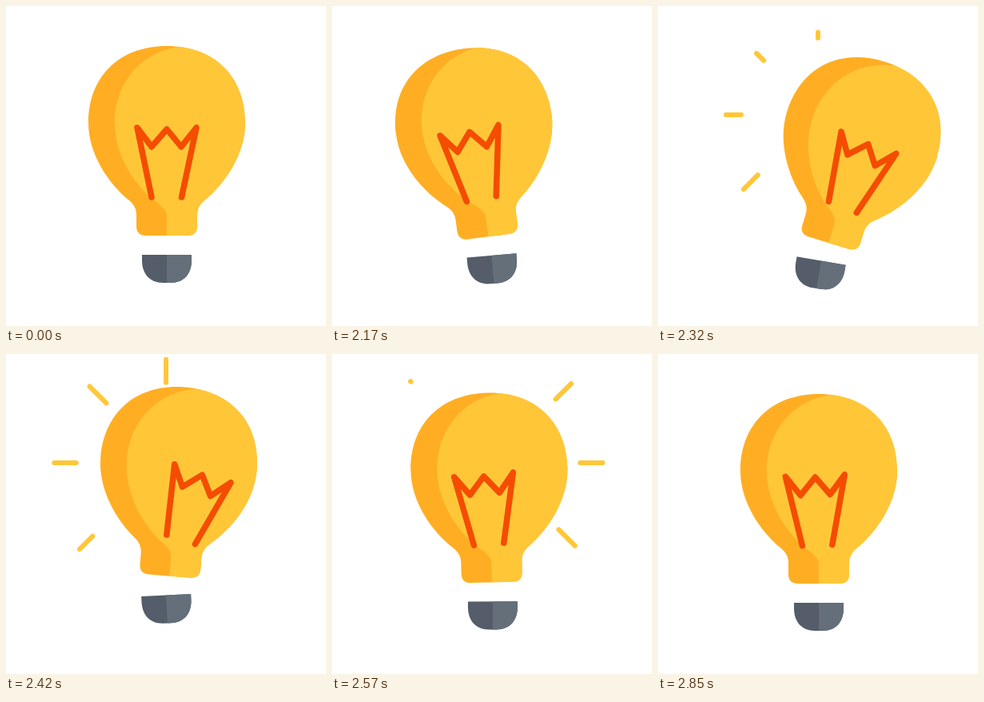
An HTML page with a canvas for the animation above (2870 ms loop, 400 px wide and 400 px high).

```html
<!DOCTYPE html>
<html lang="en">
<head>
<meta charset="utf-8">
<title>Light bulb</title>
<style>
html, body { margin: 0; width: 100%; height: 100%; overflow: hidden; background: #fff; }
canvas { display: block; width: 400px; height: 400px; }
</style>
</head>
<body>
<canvas id="stage"></canvas>
<script>
const LOOP = 2870, START = 2020, STEP = 25;
const YELLOW = '#ffc738', AMBER = '#ffae23', RED = '#f44c00';
const SLATE = '#545d69', GREY = '#646f7a';
const CX = 201, PIVOT = 329, WIRE_PIVOT = 285;

const canvas = document.getElementById('stage');
const ctx = canvas.getContext('2d');
const ratio = window.devicePixelRatio || 1;
canvas.width = canvas.height = 400 * ratio;

const bulbShape = new Path2D(
  'M201 50C260 50 299 88 299 146C299 185 274 222 248 243C242 248 239 254 239 261' +
  'V275Q239 287 227 287H175Q163 287 163 275V261C163 254 160 248 154 243' +
  'C128 222 103 185 103 146C103 88 142 50 201 50Z');
const litShape = new Path2D(
  'M218 51C170 56 136 96 136 146C136 185 159 222 185 243C196 251 201 256 201 263V290H310V40H218Z');
const baseShape = new Path2D('M170 311H232V318C232 335 222 346 206 346H196C180 346 170 335 170 318Z');
const wireShape = new Path2D('M182 239L164 152L182 176L201 154L219 176L238 152L219.5 239');

function ease(x) {
  const u = Math.min(1, Math.max(0, x));
  return u * u * (3 - 2 * u);
}

// Eases 0 -> back -> over -> rebound -> 0, reaching each pose at its beat
function swing(t, beats, back, over, rebound) {
  const poses = [0, back, over, rebound, 0];
  let value = 0;
  for (let i = 1; i < poses.length; i++) {
    const part = ease((t - beats[i - 1]) / (beats[i] - beats[i - 1]));
    value += (poses[i] - poses[i - 1]) * part;
  }
  return value;
}

// Degrees for the turning parts, pixels for the lift
const baseTurn = t => swing(t, [2000, 2155, 2290, 2430, 2600], -5.5, 11.5, -3);
const bulbTurn = t => swing(t, [1972, 2160, 2285, 2500, 2850], -7.9, 18.5, -1.6);
const wireTurn = t => swing(t, [1965, 2170, 2360, 2540, 3110], -10.3, 26, -4.5);
const lift = t => swing(t, [1920, 2125, 2263, 2435, 2615], -3.2, 13.2, -10);

function turn(degrees, y) {
  ctx.translate(CX, y);
  ctx.rotate(degrees * Math.PI / 180);
  ctx.translate(-CX, -y);
}

function fill(shape, color) {
  ctx.fillStyle = color;
  ctx.fill(shape);
}

// Seven rays, clockwise from lower left; the right side follows the left
function drawRays(t) {
  ctx.strokeStyle = YELLOW;
  ctx.lineWidth = 6;
  for (let i = 0; i < 7; i++) {
    const angle = (i + 3) * Math.PI / 4;
    const cos = Math.cos(angle), sin = Math.sin(angle);
    const age = t - (i < 4 ? 2184 + 24 * i : 2325 + 8 * i);
    const head = ease(age / 260), tail = ease((age - 122) / 230);
    if (head - tail < 0.005) continue;
    const inner = 96 + 14 * Math.max(0, sin);
    const near = inner + 48 * tail, far = inner + 48 * head;
    ctx.beginPath();
    ctx.moveTo(200 + near * cos, 136 + near * sin);
    ctx.lineTo(200 + far * cos, 136 + far * sin);
    ctx.stroke();
  }
}

function drawBase(angle) {
  ctx.save();
  turn(angle, PIVOT);
  fill(baseShape, SLATE);
  ctx.clip(baseShape);
  ctx.fillStyle = GREY;
  ctx.fillRect(CX, 305, 40, 50);
  ctx.restore();
}

function drawBulb(angle, wireAngle) {
  ctx.save();
  turn(angle, PIVOT);
  fill(bulbShape, AMBER);
  ctx.save();
  ctx.clip(bulbShape);
  fill(litShape, YELLOW);
  ctx.restore();
  turn(wireAngle - angle, WIRE_PIVOT);
  ctx.strokeStyle = RED;
  ctx.lineWidth = 7.5;
  ctx.stroke(wireShape);
  ctx.restore();
}

function draw(t) {
  const moving = t >= START;
  const time = START + Math.floor((t - START) / STEP) * STEP;
  const at = motion => moving ? motion(time) : 0;
  ctx.setTransform(ratio, 0, 0, ratio, 0, 0);
  ctx.fillStyle = '#fff';
  ctx.fillRect(0, 0, 400, 400);
  ctx.lineCap = ctx.lineJoin = 'round';
  if (moving) drawRays(time);
  ctx.translate(0, at(lift));
  drawBase(at(baseTurn));
  drawBulb(at(bulbTurn), at(wireTurn));
}

let origin = null;
function tick(now) {
  if (origin === null) origin = now;
  draw((now - origin) % LOOP);
  requestAnimationFrame(tick);
}
draw(0);
requestAnimationFrame(tick);
</script>
</body>
</html>
```
